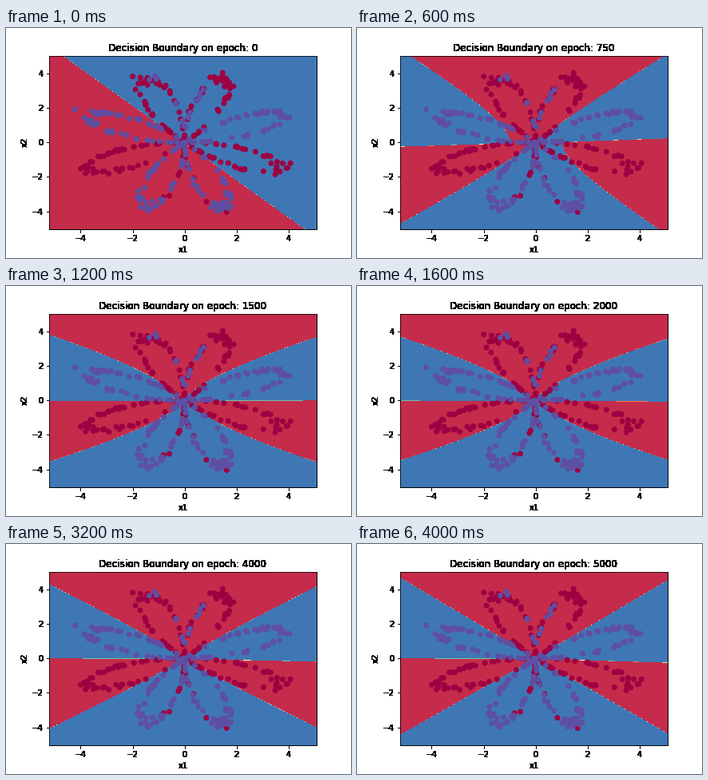
A matplotlib script that plays this animation: 432 by 288 pixels, repeating every 4.2 s.

```python
import numpy as np
import matplotlib.pyplot as plt
from matplotlib.animation import FuncAnimation

FRAMES, EPOCH_STEP, GRID = 21, 250, 0.01
WEDGE_START = 3


def make_flower(per_class=200, petal=4):
    rng = np.random.RandomState(1)
    parts = []
    for j in range(2):
        t = np.linspace(j * 3.12, (j + 1) * 3.12, per_class)
        t = t + rng.randn(per_class) * 0.2
        r = petal * np.sin(4 * t) + rng.randn(per_class) * 0.2
        parts.append((r * np.sin(t), r * np.cos(t)))
    return np.hstack(parts), np.repeat([0, 1], per_class)


(px, py), labels = make_flower()
xs = np.arange(px.min() - 1, px.max() + 1, GRID)
ys = np.arange(py.min() - 1, py.max() + 1, GRID)
y = ys[:, None]
dist = np.maximum(np.abs(xs), 1e-6)
rel = dist / np.where(xs < 0, -xs[0], xs[-1])


def classify_line(step):
    """Early training: one straight boundary that flips, then turns."""
    if step == 0:
        return y > -1.08 * xs
    return y < (1.2 - 0.11 * step) * xs


def classify_wedges(step):
    """Later training: two wedges open, settle quickly, then widen slowly."""
    settle = np.exp((4 - step) / 1.75)
    reach = 2.66 + 0.09 * step + 1.47 * settle
    bend = min(1, 0.45 + 0.03 * step + 0.22 * settle)
    tip = 0.7 * (4 / step) ** 1.3
    opening = np.sqrt(np.clip(1 - (tip / dist) ** 2, 0, None))

    def arm(scale, dip):
        return reach * (scale - dip * settle) * rel ** bend

    mid_left = (0.02 - 0.14 * settle) * rel * opening
    mid_right = (0.14 * settle - 0.014 * (step - 4)) * rel * opening
    wedge_left = (y > mid_left) & (y < arm(1.045, 0.03) * opening)
    wedge_right = (y < mid_right) & (y > -arm(0.98, -0.01) * opening)
    left = (y < -arm(1.0, 0.08)) | wedge_left
    right = (y < arm(1.01, 0.05)) & ~wedge_right
    return np.where(xs < 0, left, right)


def solid(image, dpi):
    """Turn every touched pixel fully opaque, for hard-edged lettering."""
    image = image.copy()
    image[..., 3] = image[..., 3] > 0
    return image, 0, 0


fig, ax = plt.subplots(figsize=(6, 4), dpi=72, facecolor="white")
fig.subplots_adjust(left=0.125, right=0.9, bottom=0.125, top=0.88)
ax.scatter(px, py, c=labels, cmap="Spectral", zorder=1.5)
ax.set(xlim=(xs[0], xs[-1]), ylim=(ys[0], ys[-1]), xlabel="x1", ylabel="x2",
       xticks=range(-4, 5, 2), yticks=range(-4, 5, 2))

hard_edged = [ax.title, ax.spines["bottom"], ax.spines["right"]]
for axis in (ax.xaxis, ax.yaxis):
    hard_edged.append(axis.label)
    for tick in axis.get_major_ticks():
        hard_edged += [tick.label1, tick.tick1line]
for artist in hard_edged:
    artist.set_agg_filter(solid)

regions = None


def update(step):
    global regions
    if regions is not None:
        regions.remove()
    classify = classify_line if step < WEDGE_START else classify_wedges
    regions = ax.contourf(xs, ys, classify(step).astype(float), cmap="Spectral")
    ax.set_title(f"Decision Boundary on epoch: {step * EPOCH_STEP}")


anim = FuncAnimation(fig, update, frames=FRAMES, interval=200,
                     repeat=True, repeat_delay=0)
plt.show()
```
